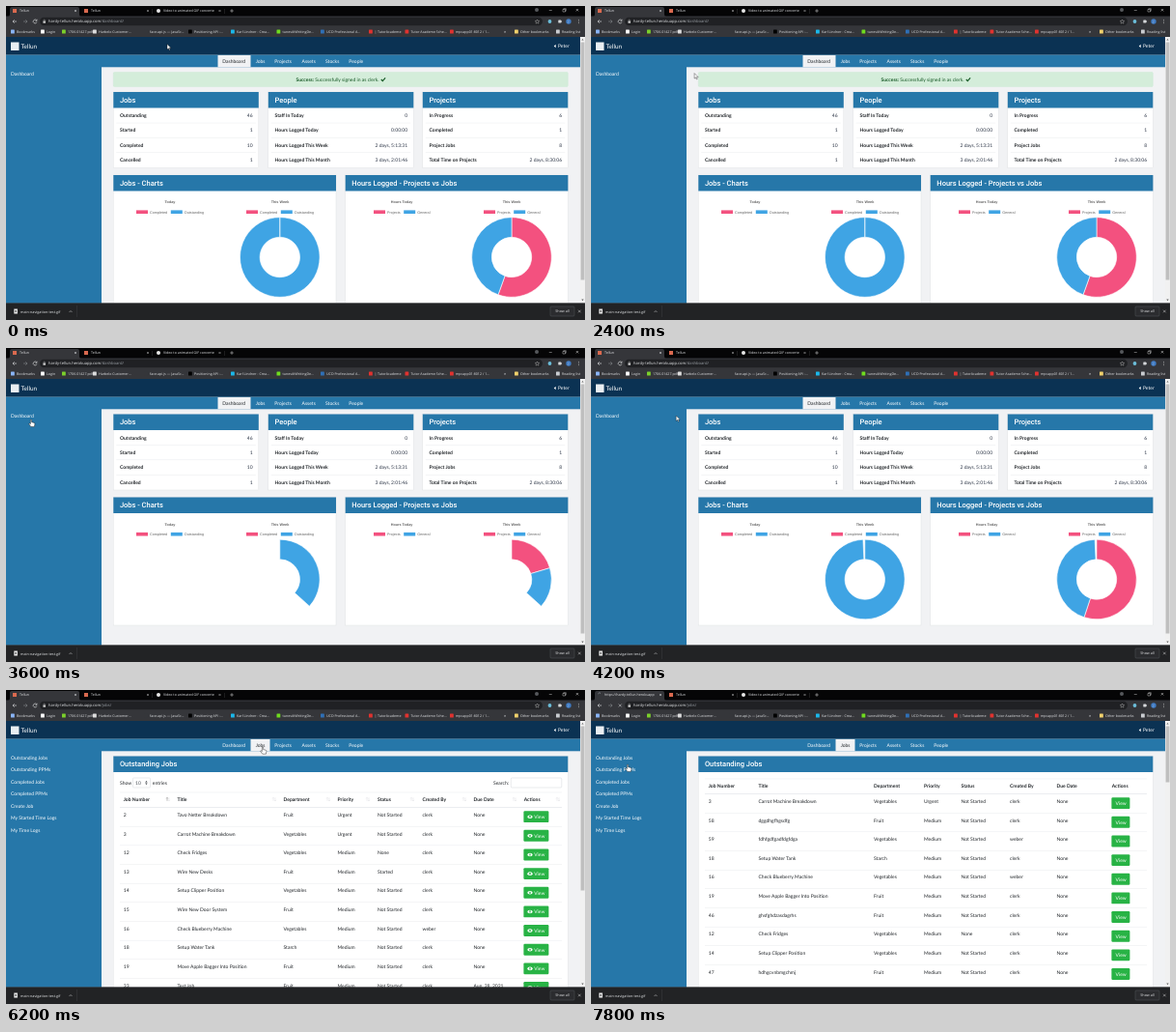
Write an HTML page that moves like this. It is 600x325 px and loops after 8 s.

```html
<!DOCTYPE html>
<html lang="en">
<head>
<meta charset="utf-8">
<title>Dashboard tour</title>
<style>
html, body { margin: 0; width: 100%; height: 100%; overflow: hidden; background: #000; }
svg { display: block; width: 100vw; height: 100vh; text-rendering: geometricPrecision; }
text { white-space: pre; }
.lato { font-family: Lato, sans-serif; }
.head { font-family: Roboto, sans-serif; font-weight: 500; }
.ui { font-family: "Open Sans", sans-serif; }
.chart { font-family: "Liberation Sans", Arial, sans-serif; }
</style>
</head>
<body>
<svg id="stage" viewBox="0 0 600 325" preserveAspectRatio="none"></svg>
<script>
const BLUE = '#2677a9', NAVY = '#0b3253', INK = '#212529', PINK = '#f3517f', SKY = '#3fa4e4';
const STEP = 200, LOOP = 8000, RELOAD = 3600, JOBS = 6200, RAW = 7800;
const BRAND = 'Tellun', HOST = 'hardy-tellun.herokuapp.com';

// Markup helpers; text is placed by its vertical centre.
const rect = (x, y, w, h, fill, extra = '') =>
  `<rect x="${x}" y="${y}" width="${w}" height="${h}" fill="${fill}" ${extra}/>`;
const dot = (x, y, r, fill) => `<circle cx="${x}" cy="${y}" r="${r}" fill="${fill}"/>`;
const stroke = (d, color, width = .6) =>
  `<path d="${d}" fill="none" stroke="${color}" stroke-width="${width}"/>`;
const text = (s, x, y, { font = 'lato', size = 5, fill = INK, weight = '', anchor = 'start', id = '' } = {}) =>
  `<text x="${x}" y="${y + size * .35}" class="${font}" font-size="${size}" fill="${fill}" text-anchor="${anchor}"` +
  `${weight && ` font-weight="${weight}"`}${id && ` id="${id}"`}>${s}</text>`;
const ui = (s, x, y, opts) => text(s, x, y, { font: 'ui', size: 3.6, fill: '#e4e6e8', ...opts });
const group = (id, body) => `<g id="${id}">${body}</g>`;
const cross = (x, y, r, color) =>
  stroke(`M${x - r} ${y - r}l${2 * r} ${2 * r}m0 ${-2 * r}l${-2 * r} ${2 * r}`, color, .5);

function card(x, y, w, h, title) {
  return rect(x, y, w, h, '#fff', 'stroke="#dcdee1" stroke-width=".4"') +
    rect(x, y, w, 16.5, BLUE) +
    text(title, x + 6.6, y + 8.2, { font: 'head', size: 7.5, fill: '#fff' });
}

function statCard(x, title, rows) {
  return card(x, 68.5, 150.5, 78.5, title) + rows.map(([label, value], i) => {
    const y = 85 + i * 15.35;
    return (i ? rect(x + 3, y, 144.5, .35, '#dee2e6') : '') +
      text(label, x + 6.7, y + 7.8, { weight: 700 }) +
      text(value, x + 144.3, y + 7.8, { anchor: 'end', fill: '#2b3445' });
  }).join('');
}

function chartHead(x, title, labels) {
  const label = (s, lx, opts) => text(s, lx, opts.y, { font: 'chart', size: 3.75, fill: '#666', ...opts });
  return label(title, x, { y: 182.3, weight: 700, anchor: 'middle' }) +
    labels.map(([s, dx], i) =>
      rect(x + dx, 190.9, 12, 3.6, i ? SKY : PINK) + label(s, x + dx + 14, { y: 192.7 })).join('');
}

function dashboard() {
  const jobLegend = [['Completed', -35], ['Outstanding', .8]];
  const hourLegend = [['Projects', -29], ['General', 2.2]];
  return statCard(111.3, 'Jobs', [['Outstanding', 46], ['Started', 1], ['Completed', 10], ['Cancelled', 1]]) +
    statCard(271.8, 'People', [['Staff In Today', 0], ['Hours Logged Today', '0:00:00'],
      ['Hours Logged This Week', '2 days, 5:13:31'], ['Hours Logged This Month', '3 days, 2:01:46']]) +
    statCard(431.8, 'Projects', [['In Progress', 6], ['Completed', 1], ['Project Jobs', 8],
      ['Total Time on Projects', '2 days, 8:30:06']]) +
    card(111.3, 154.5, 230.7, 132.5, 'Jobs - Charts') +
    card(351.7, 154.5, 230.7, 132.5, 'Hours Logged - Projects vs Jobs') +
    chartHead(170, 'Today', jobLegend) + chartHead(284, 'This Week', jobLegend) +
    chartHead(410, 'Hours Today', hourLegend) + chartHead(524, 'This Week', hourLegend) +
    group('rings', '');
}

const alertBox = rect(111.3, 68.5, 471, 15, '#d4edda', 'rx="1" stroke="#c3e6cb" stroke-width=".3"') +
  text('<tspan font-weight="700">Success:</tspan> Successfully signed in as clerk.', 343.5, 76,
    { fill: '#155724', anchor: 'middle' }) +
  stroke('M388.8 76l1.5 1.6 2.8-3.2', '#155724', 1.2);

const HEADINGS = ['Job Number', 'Title', 'Department', 'Priority', 'Status', 'Created By', 'Due Date', 'Actions'];

function jobTable(top, columns, rows, withIcons) {
  const line = (y, h = .35) => rect(118, y, 458, h, '#dee2e6');
  const [buttonX, buttonW] = [columns[7] - .3, withIcons ? 26 : 19];
  const sortX = [168, 278, 334, 375, 421, 475, 527, 572];
  const head = HEADINGS.map((s, i) => text(s, columns[i], top + 7.6, { weight: 700 }) + (withIcons
    ? stroke(`M${sortX[i] - 1} ${top + 9}v-3.4l-.8 .9m.8-.9l.8 .9`, i ? '#d3d5d8' : '#555', .4) +
      stroke(`M${sortX[i] + 1} ${top + 5.6}v3.4l-.8-.9m.8 .9l.8-.9`, '#d3d5d8', .4) : '')).join('');
  const body = rows.map((row, r) => {
    const y = top + 15.6 + r * 19.65;
    const cells = row.split('|');
    if (cells.length < 7) cells.push('None');
    return (r ? line(y) : '') + cells.map((s, i) => text(s, columns[i], y + 7.7)).join('') +
      rect(buttonX, y + 3.8, buttonW, 11.9, '#28b345', 'rx="1.2"') +
      (withIcons ? `<ellipse cx="${buttonX + 6.6}" cy="${y + 9.8}" rx="2.7" ry="1.8" fill="#fff"/>` +
        dot(buttonX + 6.6, y + 9.8, 1.1, '#28b345') + dot(buttonX + 6.6, y + 9.8, .5, '#fff') : '') +
      text('View', buttonX + (withIcons ? 10.8 : 4.2), y + 9.8, { fill: '#fff' });
  }).join('');
  return line(top) + head + line(top + 15.2, .6) + body;
}

const jobsCard = card(111.3, 68.5, 471, 260, 'Outstanding Jobs');
const field = (x, y, w, h) => rect(x, y, w, h, '#fff', 'rx="1" stroke="#c8cdd2" stroke-width=".4"');

const jobsPage = () => jobsCard +
  text('Show', 118, 96) + field(131.5, 91, 18, 10) + text('10', 134, 96, { fill: '#495057' }) +
  `<path d="M144.2 95.6l1.2-1.6 1.2 1.6zm0 .9l1.2 1.6 1.2-1.6z" fill="#343a40"/>` +
  text('entries', 151.8, 96) + text('Search:', 505, 96) + field(523.3, 91, 52.5, 10) +
  jobTable(105.8, [121.8, 177.5, 287.5, 343.5, 385, 431.5, 484.5, 536.7], [
    '2|Tavo Netter Breakdown|Fruit|Urgent|Not Started|clerk',
    '3|Carrot Machine Breakdown|Vegetables|Urgent|Not Started|clerk',
    '12|Check Fridges|Vegetables|Medium|None|clerk',
    '13|Wire New Desks|Fruit|Medium|Started|clerk',
    '14|Setup Clipper Position|Vegetables|Medium|Not Started|clerk',
    '15|Wire New Door System|Fruit|Medium|Not Started|clerk',
    '16|Check Blueberry Machine|Vegetables|Medium|Not Started|weber',
    '18|Setup Water Tank|Starch|Medium|Not Started|clerk',
    '19|Move Apple Bagger Into Position|Fruit|Medium|Not Started|clerk',
    '33|Test Job|Fruit|Medium|Not Started|clerk|Aug. 28, 2021'], true);

const rawPage = () => jobsCard +
  jobTable(91.8, [121.8, 173.5, 293, 345, 383.5, 434, 482.5, 539.7], [
    '3|Carrot Machine Breakdown|Vegetables|Urgent|Not Started|clerk',
    '58|dggdhgfhgsdfg|Fruit|Medium|Not Started|clerk',
    '59|fdhfgdfgadfdgfdga|Vegetables|Medium|Not Started|weber',
    '18|Setup Water Tank|Starch|Medium|Not Started|clerk',
    '16|Check Blueberry Machine|Vegetables|Medium|Not Started|weber',
    '19|Move Apple Bagger Into Position|Fruit|Medium|Not Started|clerk',
    '46|ghsfghdzasdagrhs|Fruit|Medium|Not Started|clerk',
    '12|Check Fridges|Vegetables|Medium|None|clerk',
    '14|Setup Clipper Position|Vegetables|Medium|Not Started|clerk',
    '47|hdhgcvnbmgchmj|Fruit|Medium|Not Started|clerk'], false);

const NAV = [['Dashboard', 224.3], ['Jobs', 258.7], ['Projects', 278.3], ['Assets', 306.5], ['Stocks', 331], ['People', 355.3]];
const siteNav = rect(0, 32, 595, 18.7, NAVY) + rect(0, 50.7, 595, 12.6, BLUE) + rect(0, 63, 99, 245, BLUE) +
  rect(5, 37.5, 8.5, 8.5, '#e9eef2') + text(BRAND, 15.5, 41.5, { size: 6.4, fill: '#fff' }) +
  `<path d="M569.7 39.7v3.6l-1.9-1.8z" fill="#fff"/>` + text('Peter', 572, 41.6, { fill: '#fff' }) +
  '<rect id="activeTab" y="51" height="12.3" fill="#f1f2f4"/>' +
  NAV.map(([s, x], i) => text(s, x, 57.2, { fill: '#fff', id: 'nav' + i })).join('') +
  group('sideDash', text('Dashboard', 5, 70.2, { fill: '#fff' })) +
  group('sideJobs', ['Outstanding Jobs', 'Outstanding PPMs', 'Completed Jobs', 'Completed PPMs', 'Create Job',
    'My Started Time Logs', 'My Time Logs'].map((s, i) => text(s, 5, 70.2 + i * 12.5, { fill: '#fff' })).join(''));

const scrollbar = rect(595, 32, 5, 276, '#f1f1f1') +
  rect(595.6, 37.5, 3.8, 10, '#bfbfbf', 'id="thumb"') +
  '<path d="M596.3 35.5l1.2-1.6 1.2 1.6zM596.3 303.6l1.2 1.6 1.2-1.6z" fill="#666"/>';

const BOOKMARKS = [
  ['Bookmarks', 11, '#8ab4f8'], ['Login', 42, '#fff'], ['1706.01427.pdf', 64, '#7bd02a'],
  ['Harbelo Customer...', 96, '#ddd'], ['face-api.js — JavaSc...', 149, '#35363a'],
  ['Positioning API -...', 195, '#000'], ['Karl Lindner - Crea...', 239, '#1ab7ea'],
  ['tunesAtWritingDe...', 286.5, '#6fdc1e'], ['UCD Professional A...', 332, '#2f6fb5'],
  ['| TutorAcademe', 382, '#e0322f'], ['Tutor Academe Sche...', 419.5, '#e0322f'],
  ['mpcapp01:8012 / 1...', 466, '#e0322f'], ['Other bookmarks', 533, '#f2d06b'], ['Reading list', 576, '#c9ccd0']];

const browser = rect(0, 0, 600, 11, '#050506') + rect(0, 10.5, 600, 21.5, '#35363a') +
  '<path d="M2 11q2 0 2-2.500V3q0-2 2-2h68q2 0 2 2v5.500q0 2.500 2 2.500z" fill="#35363a"/>' +
  rect(7, 3, 4, 4, '#d9694f', 'id="favicon"') +
  `<g id="spinner">${stroke('M0-2A2 2 0 0 1 2 0', '#9aa0a6', .6)}</g>` +
  ui(BRAND, 14, 5, { id: 'tabTitle' }) + cross(72, 5, 1, '#e4e6e8') +
  rect(81, 3, 4, 4, '#d9694f') + ui(BRAND, 88, 5) + cross(147, 5, 1, '#bbb') + rect(151.5, 3, .3, 5, '#555') +
  dot(158, 5, 2, '#e8e8e8') + ui('Video to animated GIF converte', 163, 5) + cross(221.5, 5, 1, '#bbb') +
  rect(226.5, 3, .3, 5, '#555') + stroke('M232.2 5h3.6m-1.800-1.800v3.600', '#ddd', .5) +
  dot(550, 4, 2, '#55585c') + stroke('M562.800 4.500h3', '#eee', .4) +
  stroke('M577 3.500h2.500v2.500h-2.500zM577.800 3.500v-.800h2.500v2.500h-.800', '#eee', .4) + cross(592, 4.2, 1.2, '#eee') +
  stroke('M11 16h-4m1.700-1.700l-1.700 1.700 1.700 1.700', '#e4e6e8') +
  stroke('M18 16h4m-1.700-1.700l1.700 1.700-1.700 1.700', '#85888c') +
  group('reload', stroke('M31.700 15a1.900 1.900 0 1 0 .200 1.600M32 13.700v1.600h-1.600', '#e4e6e8')) +
  group('stop', cross(30.2, 16, 1.5, '#e4e6e8')) +
  rect(35, 11.8, 521, 8.4, '#202124', 'rx="4.200"') +
  rect(38.4, 15.5, 2.6, 2.2, '#ccc') + stroke('M39 15.500v-.700a.700 .700 0 0 1 1.400 0v.700', '#ccc', .4) +
  ui(`${HOST}<tspan id="path" fill="#9aa0a6"></tspan>`, 44, 16, { size: 4.1 }) +
  stroke('M550.500 14l.700 1.400 1.500 .200-1.100 1 .300 1.500-1.400-.700-1.400 .700 .300-1.500-1.100-1 1.500-.200z', '#ccc', .4) +
  dot(563.5, 16, 1.9, '#6bbcd8') + rect(572.3, 14.5, 3, 3, '#d4d6d9', 'rx=".500"') + dot(575.3, 16, .8, '#d4d6d9') +
  dot(583, 16, 2.7, '#3f7bc4') + ui('J', 583, 16, { anchor: 'middle', size: 3.4 }) +
  [14.3, 16, 17.7].map(y => dot(593.5, y, .45, '#ddd')).join('') +
  BOOKMARKS.map(([s, x, color]) => rect(x - 6, 24.6, 3.8, 3.8, color, 'rx=".500"') + ui(s, x, 26.5)).join('') +
  ui('»', 516, 26.2, { size: 4.5 });

const downloads = rect(0, 307.5, 600, 17.5, '#222325') + rect(0, 307.3, 600, .4, '#45474a') +
  rect(8.3, 313.5, 3.6, 5, '#e9e9e9') + rect(9.2, 315, 1.8, 1.8, '#777') +
  ui('main-navigation-test.gif', 15, 316.2, { size: 3.75 }) +
  stroke('M65.500 317l1.500-1.500 1.500 1.500', '#ddd', .5) + rect(73, 310, .3, 12, '#505255') +
  rect(564, 311, 25, 10, '#2b2c2f', 'rx="1" stroke="#5f6368" stroke-width=".400"') +
  ui('Show all', 576.5, 316, { anchor: 'middle', size: 3.75 }) + cross(594.3, 316, 1.3, '#ddd');

const cursor = group('arrow', '<path d="M0 0v5.500l1.300-1.200 .900 2 .900-.400-.900-1.900h1.800z" fill="#fff" stroke="#000" stroke-width=".350"/>') +
  group('hand', '<path d="M-.600 .300q.600-.800 1.200 0v2.500l2.500 .600q.900 .300 .800 1.200l-.500 2.800h-3.600l-2.200-3q.500-.900 1.800 .300z" fill="#fff" stroke="#000" stroke-width=".400"/>');

document.getElementById('stage').innerHTML = rect(0, 32, 600, 276, '#f1f2f4') +
  group('alert', alertBox) + group('dash', dashboard()) + group('jobs', jobsPage()) + group('raw', rawPage()) +
  siteNav + scrollbar + browser + downloads + group('cursor', cursor);

const $ = id => document.getElementById(id);
const show = (id, on) => $(id).setAttribute('visibility', on ? 'visible' : 'hidden');

// One doughnut; shares are fractions of a turn, all swept open by progress.
function ring(cx, shares, progress) {
  const cy = 239.5, outer = 41.3, inner = 20.7;
  let from = 0;
  return shares.map(([share, color]) => {
    const to = from + Math.min(share * progress, .9999) * 2 * Math.PI;
    const at = (r, a) => `${cx + r * Math.sin(a)} ${cy - r * Math.cos(a)}`;
    const large = +(to - from > Math.PI);
    const d = `M${at(outer, from)}A${outer} ${outer} 0 ${large} 1 ${at(outer, to)}` +
      `L${at(inner, to)}A${inner} ${inner} 0 ${large} 0 ${at(inner, from)}Z`;
    from = to;
    return `<path d="${d}" fill="${color}" stroke="#fff" stroke-width=".6"/>`;
  }).join('');
}

// Pointer stops: time, x, y of the hot spot.
const STOPS = [[0, 167, 39.5], [400, 167, 39.5], [1400, 256.5, 61.5], [1800, 256.5, 61.5], [2800, 26, 74],
  [3800, 26, 74], [5000, 266, 58.8], [6600, 266, 58.8], [7400, 38, 77], [LOOP, 38, 77]];

function pointer(t) {
  const i = STOPS.findIndex(s => s[0] > t);
  const [t0, x0, y0] = STOPS[i - 1], [t1, x1, y1] = STOPS[i];
  const u = (t - t0) / (t1 - t0), k = u * u * (3 - 2 * u);
  return [x0 + (x1 - x0) * k, y0 + (y1 - y0) * k];
}

function draw(t) {
  const onJobs = t >= JOBS, raw = t >= RAW, reloaded = t >= RELOAD;
  const loading = (t >= 3200 && t < RELOAD) || (t >= 5800 && t < JOBS) || t >= 7600;

  show('alert', !reloaded);
  show('dash', !onJobs);
  show('jobs', onJobs && !raw);
  show('raw', raw);
  show('sideDash', !onJobs);
  show('sideJobs', onJobs);
  $('dash').setAttribute('transform', `translate(0 ${reloaded ? 0 : 20.5})`);

  const age = reloaded ? Math.min((t - RELOAD + 108) / 1000, 1) : 1;
  const progress = 1 - (1 - age) ** 4;
  $('rings').innerHTML = ring(283.8, [[1, SKY]], progress) +
    ring(524, [[.555, PINK], [.445, SKY]], progress);

  const active = onJobs ? 1 : 0;
  $('activeTab').setAttribute('x', active ? 253.5 : 219.5);
  $('activeTab').setAttribute('width', active ? 20 : 34);
  NAV.forEach((_, i) => $('nav' + i).setAttribute('fill', i === active ? INK : '#fff'));
  $('thumb').setAttribute('height', raw ? 58 : onJobs ? 170 : reloaded ? 258 : 246);

  show('favicon', !loading);
  show('spinner', loading);
  show('reload', !loading);
  show('stop', loading);
  $('spinner').setAttribute('transform', `translate(9 5) rotate(${t * .5})`);
  $('tabTitle').textContent = raw ? `https://${HOST.slice(0, 22)}` : BRAND;
  $('path').textContent = onJobs ? '/jobs/' : '/dashboard/';

  const [x, y] = pointer(t);
  const overLink = (y > 51 && y < 63 && x > 219 && x < 375) || (x < 52 && y > 66);
  show('arrow', !overLink);
  show('hand', overLink);
  $('cursor').setAttribute('transform', `translate(${x} ${y})`);
}

function tick() {
  draw(Math.floor(performance.now() % LOOP / STEP) * STEP);
  requestAnimationFrame(tick);
}
tick();
</script>
</body>
</html>
```
